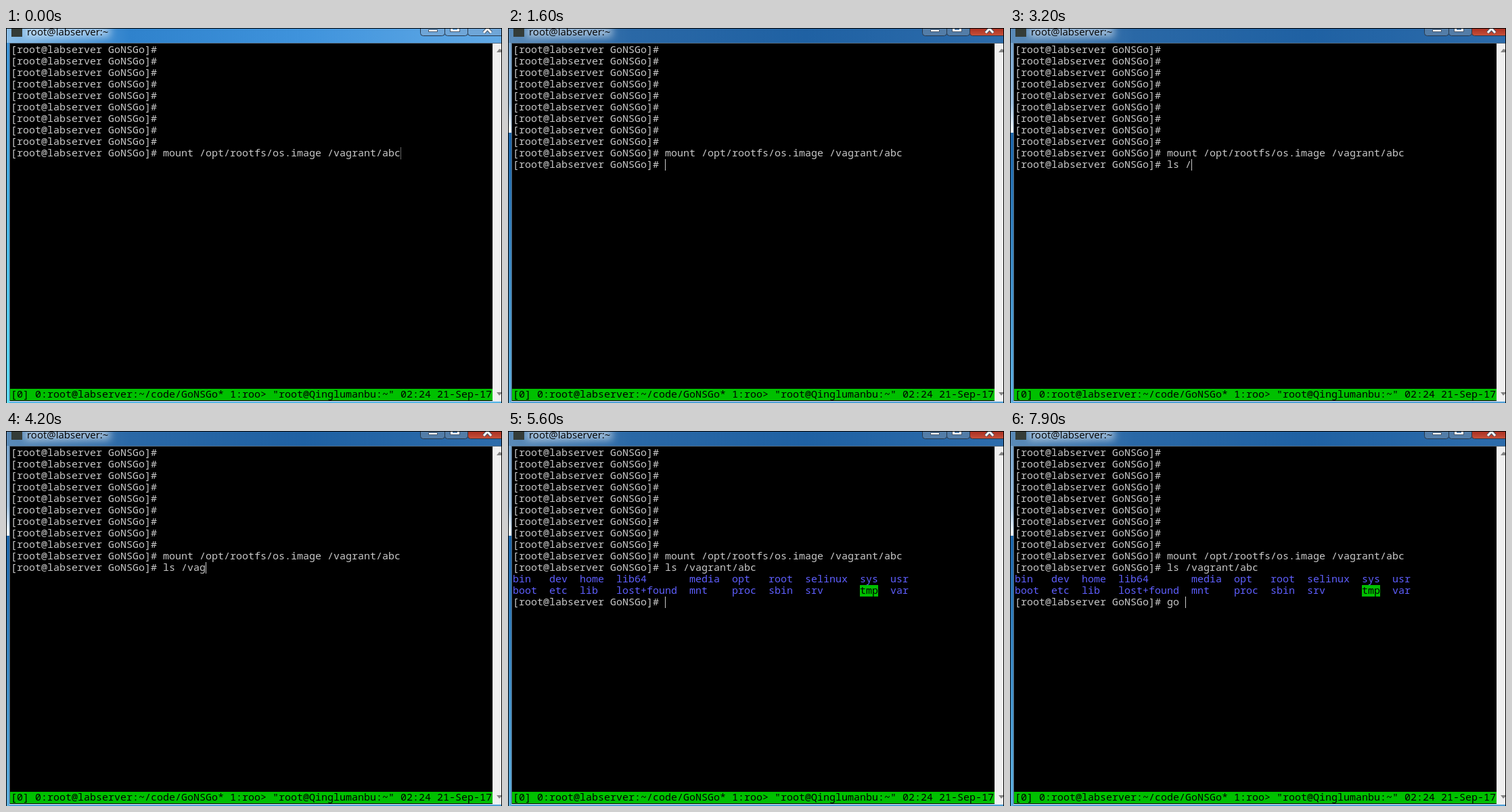
Animation, 733 px wide and 555 px high, one loop 8 s. Source, as an HTML page with a canvas:

```html
<!DOCTYPE html>
<html lang="en">
<head>
<meta charset="utf-8">
<title>Terminal</title>
<style>
html, body { margin: 0; width: 100%; height: 100%; overflow: hidden; background: #000; }
canvas { display: block; }
</style>
</head>
<body>
<canvas id="stage" width="733" height="555"></canvas>
<script>
const ctx = document.getElementById('stage').getContext('2d');
const LOOP = 8000, LEFT = 7, TOP = 24, CELL = 9, ROW = 17;
const MONO = '15px "Noto Sans Mono", "DejaVu Sans Mono", monospace';
const GREY = '#c8c8c8', GREEN = '#00c000', BLUE = '#5f5fff';
const HOST = 'labserver';
const PROMPT = `[root@${HOST} GoNSGo]# `;
const MOUNT = 'mount /opt/rootfs/os.image /vagrant/abc';
const LIST = 'ls /vagrant/abc';
const STATUS = `[0] 0:root@${HOST}:~/code/GoNSGo* 1:roo> "root@Qinglumanbu:~" 02:24 21-Sep-17`;

// Directory listing: column, upper name, lower name
const DIRS = [
  [0, 'bin', 'boot'], [6, 'dev', 'etc'], [11, 'home', 'lib'], [17, 'lib64', 'lost+found'],
  [29, 'media', 'mnt'], [36, 'opt', 'proc'], [42, 'root', 'sbin'], [48, 'selinux', 'srv'],
  [57, 'sys', 'tmp'], [62, 'usr', 'var']
];

// Session steps: start time, row of the active prompt, typed text, cursor shown
const STEPS = [
  [0, 9, MOUNT, 1], [1000, 9, MOUNT, 0], [1500, 9, MOUNT, 1],
  [1600, 10, '', 1], [2100, 10, '', 0], [2600, 10, '', 1],
  [3000, 10, 'l', 1], [3100, 10, 'ls ', 1], [3200, 10, 'ls /', 1],
  [3400, 10, 'ls /v', 1], [3500, 10, 'ls /va', 1], [4100, 10, 'ls /va', 0],
  [4200, 10, 'ls /vag', 1], [4400, 10, 'ls /vagrant/', 1], [4800, 10, 'ls /vagrant/a', 1],
  [5000, 10, 'ls /vagrant/ab', 1], [5200, 10, LIST, 1],
  [5600, 13, '', 1], [6000, 13, '', 0], [6500, 13, '', 1], [7000, 13, '', 0], [7500, 13, '', 1],
  [7700, 13, 'g', 1], [7800, 13, 'go', 1], [7900, 13, 'go ', 1]
];

function rect(x, y, w, h, fill) {
  ctx.fillStyle = fill;
  ctx.fillRect(x, y, w, h);
}

function gradient(dx, dy, stops) {
  const g = ctx.createLinearGradient(0, 0, dx, dy);
  stops.forEach(([at, color]) => g.addColorStop(at, color));
  return g;
}

function print(text, col, row, color = GREY) {
  ctx.font = MONO;
  ctx.fillStyle = color;
  ctx.fillText(text, LEFT + col * CELL, TOP + row * ROW + 13);
}

function path(points, fill) {
  ctx.beginPath();
  points.forEach(([x, y]) => ctx.lineTo(x, y));
  ctx.closePath();
  ctx.fillStyle = fill;
  ctx.fill();
}

function button(x, w, fill) {
  ctx.beginPath();
  ctx.roundRect(x + 0.5, -5.5, w, 17, 4);
  ctx.fillStyle = fill;
  ctx.fill();
  ctx.strokeStyle = '#26384c';
  ctx.lineWidth = 1;
  ctx.stroke();
}

function drawFrame(active) {
  rect(0, 0, 733, 555, active ? '#4f9ed6' : '#55b4e6');
  rect(0, 0, 733, 22, active
    ? gradient(733, 0, [[0, '#5b8bb8'], [0.25, '#2a68a6'], [0.6, '#1f61a3'], [1, '#2d6cab']])
    : gradient(733, 0, [[0, '#8cbfe8'], [0.25, '#2f82cc'], [0.6, '#3f93dc'], [1, '#62aae6']]));
  rect(1, 22, 4, 533, active
    ? gradient(0, 555, [[0, '#6f9dc8'], [0.2, '#9cc0e0'], [0.27, '#eef5fa'], [0.28, '#eef5fa'], [0.28, '#1c66ab'], [1, '#5fb0e0']])
    : gradient(0, 555, [[0, '#3c8fd4'], [0.5, '#49b4e6'], [1, '#5fdcf4']]));

  // Soft glow behind the title
  ctx.save();
  ctx.filter = 'blur(6px)';
  rect(28, -2, 126, 15, 'rgba(255,255,255,.55)');
  ctx.restore();
  rect(0, 0, 733, 1, '#000');
  rect(0, 0, 1, 555, '#000');
  rect(8, 1, 16, 12, '#343c38');
  ctx.font = '15px "Open Sans", "Noto Sans", sans-serif';
  ctx.fillStyle = '#000';
  ctx.fillText(`root@${HOST}:~`, 31, 11);

  ctx.save();
  ctx.beginPath();
  ctx.rect(1, 1, 731, 21);
  ctx.clip();
  const pale = active ? '#537da8' : '#6fa6d8';
  button(612, 36, pale);
  button(648, 34, pale);
  button(682, 55, active ? gradient(0, 12, [[0, '#a82e20'], [1, '#c9533c']]) : pale);
  ctx.strokeStyle = '#46566a';
  ctx.fillStyle = '#fff';
  for (const [x, y, w, h] of [[624, 2, 14, 4], [656, -4, 15, 10]]) {
    ctx.fillRect(x, y, w, h);
    ctx.strokeRect(x + 0.5, y + 0.5, w - 1, h - 1);
  }
  rect(660, 0, 7, 3, pale);
  for (const [color, width] of [['#46566a', 5], ['#fff', 3]]) {
    ctx.strokeStyle = color;
    ctx.lineWidth = width;
    ctx.beginPath();
    ctx.moveTo(706, 7);
    ctx.lineTo(711.5, 1);
    ctx.lineTo(717, 7);
    ctx.stroke();
  }
  ctx.restore();

  rect(5, 22, 727, 1, '#53687c');
  rect(5, 22, 1, 531, '#53687c');
  rect(6, 23, 713, 529, '#000');
  rect(719, 23, 13, 529, '#f0f0f0');
  path([[725, 36], [732, 36], [732, 32], [729, 31]], '#858585');
  path([[725, 539], [732, 539], [732, 541], [729, 544]], '#858585');
  rect(5, 552, 727, 1, '#dceaf4');
  rect(732, 0, 1, 555, '#000');
}

function drawListing() {
  rect(LEFT + 57 * CELL, TOP + 12 * ROW, 3 * CELL, ROW, GREEN);
  for (const [col, upper, lower] of DIRS) {
    print(upper, col, 11, BLUE);
    print(lower, col, 12, lower === 'tmp' ? '#000' : BLUE);
  }
}

function drawCursor(col, row, active) {
  const x = LEFT + col * CELL, y = TOP + row * ROW;
  if (active) rect(x, y, 1, ROW, GREY);
  else for (let i = 0; i < ROW; i += 2) rect(x, y + i, 1, 1, GREY);
}

function draw(time) {
  const active = time >= 500;
  const [, row, typed, cursor] = STEPS.findLast(step => step[0] <= time);
  drawFrame(active);
  for (let i = 0; i < 9; i++) print(PROMPT, 0, i);
  print(PROMPT + MOUNT, 0, 9);
  if (row === 13) {
    print(PROMPT + LIST, 0, 10);
    drawListing();
  }
  if (row > 9) print(PROMPT + typed, 0, row);
  if (cursor) drawCursor(PROMPT.length + typed.length, row, active);
  rect(6, TOP + 30 * ROW, 713, ROW, GREEN);
  print(STATUS, 0, 30, '#000');
}

const start = performance.now();
function tick() {
  draw((performance.now() - start) % LOOP);
  requestAnimationFrame(tick);
}
tick();
</script>
</body>
</html>
```
